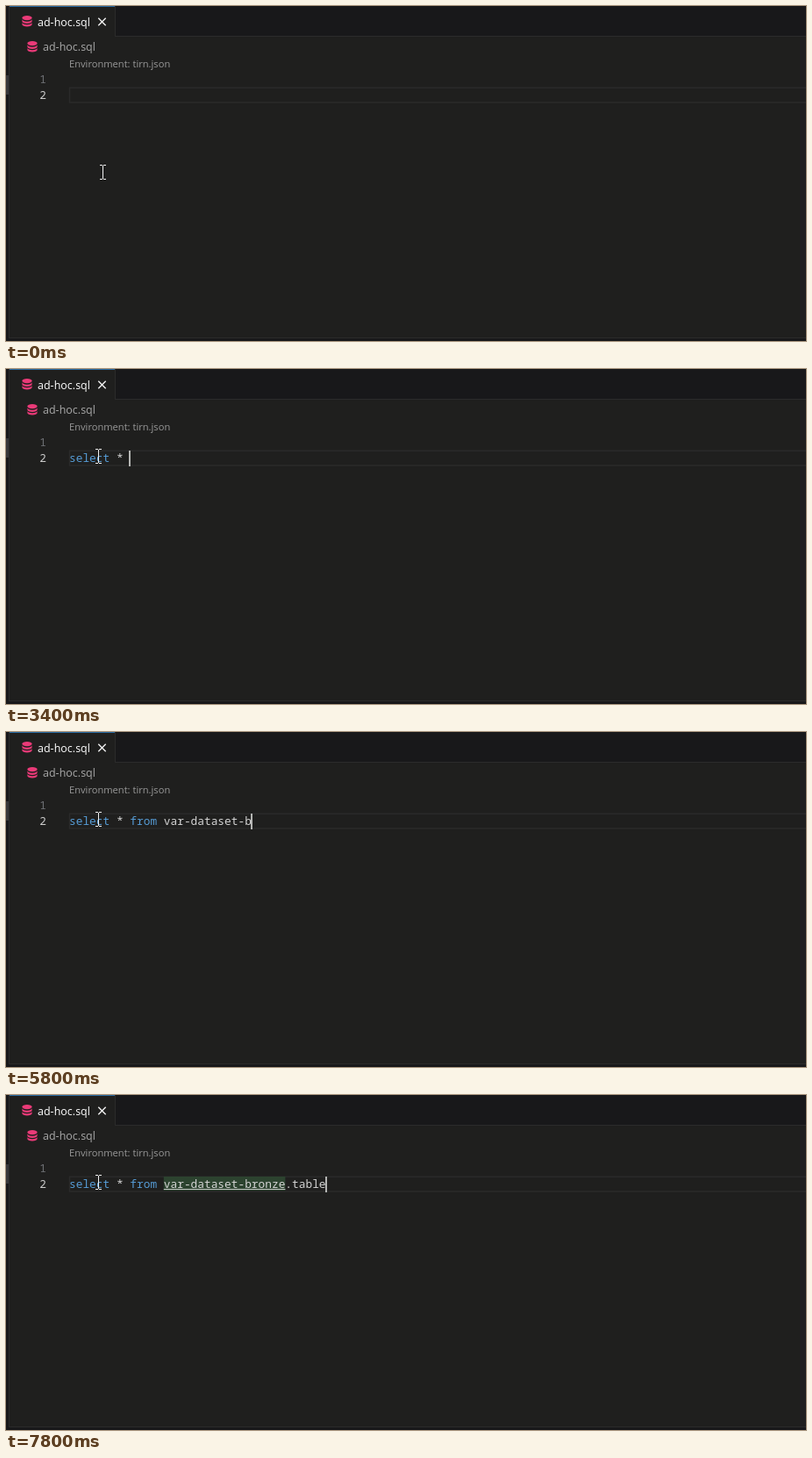
An HTML page with a canvas that plays this animation: 912 by 382 pixels, repeating every 8 s.

```html
<!DOCTYPE html>
<html lang="en">
<head>
<meta charset="utf-8">
<title>Typing a query</title>
<style>
  html, body { margin: 0; width: 100%; height: 100%; overflow: hidden; background: #1f1f1e; }
  canvas { display: block; }
</style>
</head>
<body>
<canvas id="stage" width="912" height="382"></canvas>
<script>
const ctx = document.getElementById('stage').getContext('2d');
const LOOP = 8000, STEP = 200;
const UI = '"Open Sans", sans-serif';
const CODE = '12.83px "Noto Sans Mono", monospace';
const CHAR = 7.7, CODE_X = 72, BASELINE = 106;
const VARIABLE_START = 14, VARIABLE_END = 32;

const TOKENS = [
  ['select', '#569cd6'],
  [' * ', '#d4d4d4'],
  ['from', '#569cd6'],
  [' var-dataset-bronze.table', '#d4d4d4']
];

// [time in ms, characters typed]
const TYPING = [[0, 0], [1600, 0], [2800, 8], [3200, 8], [3400, 9], [4400, 19],
                [5600, 26], [6600, 31], [6800, 32], [7800, 38], [LOOP, 38]];

function typedCount(t) {
  const i = TYPING.findIndex(([end]) => t < end);
  const [t0, n0] = TYPING[i - 1], [t1, n1] = TYPING[i];
  return Math.floor(n0 + (n1 - n0) * (t - t0) / (t1 - t0) + 1e-6);
}

function rect(color, x, y, w, h) {
  ctx.fillStyle = color;
  ctx.fillRect(x, y, w, h);
}

function text(str, x, y, color, font) {
  ctx.font = font;
  ctx.fillStyle = color;
  ctx.fillText(str, x, y);
}

function databaseIcon(cx, top) {
  const rx = 5.6, ry = 2.6;
  ctx.fillStyle = '#ea3a78';
  ctx.beginPath();
  ctx.ellipse(cx, top + ry, rx, ry, 0, 0, 7);
  ctx.fill();
  for (const y of [top + 4.1, top + 7.7]) {
    ctx.beginPath();
    ctx.ellipse(cx, y, rx, ry, 0, Math.PI, 0, true);
    ctx.lineTo(cx + rx, y + 2.3);
    ctx.ellipse(cx, y + 2.3, rx, ry, 0, 0, Math.PI);
    ctx.fill();
  }
}

function closeIcon(x, y, r) {
  ctx.strokeStyle = '#f0f0f0';
  ctx.lineWidth = 1.4;
  ctx.beginPath();
  ctx.moveTo(x - r, y - r);
  ctx.lineTo(x + r, y + r);
  ctx.moveTo(x + r, y - r);
  ctx.lineTo(x - r, y + r);
  ctx.stroke();
}

function drawWindow() {
  const bar = '#18181a', border = '#2b2b2b';
  rect('#1f1f1e', 0, 0, 912, 382);
  rect(bar, 0, 0, 3, 382);
  rect('#37373a', 0, 79, 3, 22);
  rect(bar, 125, 0, 787, 34);
  rect(border, 125, 34, 787, 1);
  rect(border, 124, 0, 1, 35);
  rect(border, 3, 0, 1, 379);
  rect('#2a6ca5', 4, 0, 120, 1);
  rect(border, 3, 378, 909, 1);
  rect(bar, 0, 379, 912, 3);

  databaseIcon(24, 11);
  text('ad-hoc.sql', 36, 22.5, '#ffffff', '12.5px ' + UI);
  closeIcon(109.5, 18, 4.2);
  databaseIcon(30, 40);
  text('ad-hoc.sql', 42, 51, '#a9a9a9', '12.5px ' + UI);
  text('Environment: tirn.json', 72, 70, '#999999', '11.14px ' + UI);

  text('1', 38.3, 87.5, '#6e7074', CODE);
  text('2', 38.3, BASELINE, '#cccccc', CODE);
  ctx.strokeStyle = '#2a2a2a';
  ctx.lineWidth = 1.5;
  ctx.strokeRect(72.5, 93.25, 850, 16.75);
}

function drawCode(count) {
  if (!count) return;
  const variableX = CODE_X + VARIABLE_START * CHAR;
  const variableWidth = (VARIABLE_END - VARIABLE_START) * CHAR;
  const resolved = count >= VARIABLE_END;
  if (resolved) rect('#2c432f', variableX, 93, variableWidth, 16);

  let start = 0;
  for (const [word, color] of TOKENS) {
    const shown = word.slice(0, Math.max(0, count - start));
    text(shown, CODE_X + start * CHAR, BASELINE, color, CODE);
    start += word.length;
  }
  if (resolved) rect('#c4c8c4', variableX, 107, variableWidth, 1);
  rect('#b4b5b3', Math.round(CODE_X + count * CHAR) - 1, 93, 2, 18);
}

function drawPointer(t) {
  const p = Math.min(1, t / 1200);
  const ease = p * p * (3 - 2 * p);
  const x = Math.round(110 - 5 * ease), y = Math.round(181 - 90 * ease);
  const white = '#f2f2f2';
  rect(white, x, y + 1, 1, 15);
  for (const edge of [y, y + 16]) {
    rect(white, x - 3, edge, 3, 1);
    rect(white, x + 1, edge, 3, 1);
  }
}

function frame(now) {
  const t = Math.floor(now % LOOP / STEP) * STEP;
  drawWindow();
  drawCode(typedCount(t));
  drawPointer(t);
  requestAnimationFrame(frame);
}

requestAnimationFrame(frame);
</script>
</body>
</html>
```
